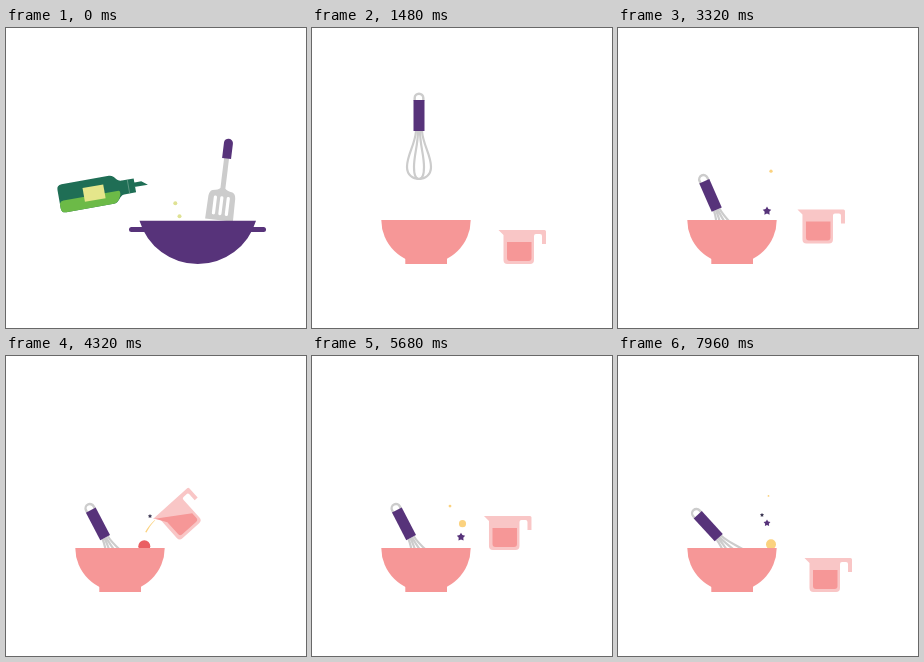
These frames come from a looping animation (300x300 px, 8000 ms). An HTML page with a canvas:

```html
<!DOCTYPE html>
<html lang="en">
<head>
<meta charset="utf-8">
<title>Mixing bowl</title>
<style>
  html, body { margin: 0; height: 100%; overflow: hidden; background: #fff; }
  canvas { display: block; width: 300px; height: 300px; }
</style>
</head>
<body>
<canvas id="stage"></canvas>
<script>
const LOOP = 8000;
const canvas = document.getElementById('stage');
const ctx = canvas.getContext('2d');
const scale = window.devicePixelRatio || 1;
canvas.width = canvas.height = 300 * scale;

const PURPLE = '#57337a', GREY = '#cccccc', PINK = '#f69797', PALE = '#f9c6c6',
      YELLOW = '#fbd27f', RED = '#ea5f63', DARK = '#3f3a55';

const mix = (a, b, p) => a + (b - a) * p;
const progress = (t, from, to) => Math.max(0, Math.min(1, (t - from) / (to - from)));
const smooth = (t, from, to) => {
  const p = progress(t, from, to);
  return p * p * (3 - 2 * p);
};

function fill(color, path) {
  ctx.fillStyle = color;
  ctx.fill(typeof path === 'string' ? new Path2D(path) : path);
}

function stroke(color, width, path) {
  ctx.strokeStyle = color;
  ctx.lineWidth = width;
  ctx.stroke(new Path2D(path));
}

function box(color, x, y, w, h, r = 0) {
  const path = new Path2D();
  path.roundRect(x, y, w, h, r);
  fill(color, path);
}

function disc(color, x, y, r) {
  const path = new Path2D();
  path.arc(x, y, r, 0, 7);
  fill(color, path);
}

function star(color, x, y, r) {
  const path = new Path2D();
  for (let i = 0; i < 10; i++) {
    const a = i * Math.PI / 5 - Math.PI / 2, d = i % 2 ? r * 0.55 : r;
    path.lineTo(x + d * Math.cos(a), y + d * Math.sin(a));
  }
  fill(color, path);
}

function placed(x, y, degrees, draw) {
  ctx.save();
  ctx.translate(x, y);
  ctx.rotate(degrees * Math.PI / 180);
  draw();
  ctx.restore();
}

function bottle() {
  fill('#1f6e55', 'M5 0H53C59 0 59 7 65 7H77V21H65C60 21 59 28.5 53 28.5H5Q0 28.5 0 23.5V5Q0 0 5 0ZM76 11L84 11L90 15.5L76 15.5Z');
  fill('#6cba47', 'M0 19Q1 16.5 4 16.5H60Q62 17 61 21Q58 28.5 53 28.5H5Q0 28.5 0 23.5Z');
  box('#e5e68b', 25, 7.5, 21, 14);
  stroke('#7fae9c', 0.6, 'M70.5 7V21');
}

function spatula() {
  box(GREY, -2.5, 18, 5, 37);
  fill(GREY, 'M-2.5 50Q-4 52 -10 53Q-13 54 -13.5 59L-14 82H14L13.5 59Q13 54 10 53Q4 52 2.5 50Z');
  for (const x of [-8, -1.5, 5]) box('#fff', x, 58, 3.2, 19, 1.5);
  box(PURPLE, -4.5, 0, 9, 20, [4.5, 4.5, 0, 0]);
}

function wokScene(t) {
  const leave = 330 * progress(t, 120, 520) ** 2;
  if (leave >= 330) return;
  placed(50.6 - leave, 157, -10, bottle);
  placed(223 + leave, 110.7, 7, spatula);
  for (const [x, y] of [[169.3, 175], [173.5, 188]]) {
    const fallen = y + t * 0.13;
    if (fallen < 197) disc('#dfe294', x, fallen, 2);
  }
  placed(leave, 0, 0, () => {
    box(PURPLE, 123, 199, 137, 5, 2.5);
    fill(PURPLE, 'M133.5 192.7H250A60.8 60.8 0 0 1 133.5 192.7Z');
  });
}

function bowl(color, x) {
  placed(x, 192, 0, () => {
    fill(color, 'M-44.7 0H44.7A44.7 44 0 0 1 -44.7 0Z');
    box(color, -20.7, 38, 41.7, 6);
  });
}

// The dark bowl catches up with the pale one on the way in.
function bowls(t) {
  const x = Math.min(114, 51 + (t - 840) * 0.37);
  if (x < 114) bowl(PALE, x);
  bowl(PINK, x - 63 * (1 - progress(t, 760, 840)));
}

// Origin is the lower end of the grip.
function whisk() {
  stroke(GREY, 2.2, 'M-3 0C-4 14 -12 24 -12 36C-12 52 12 52 12 36C12 24 4 14 3 0');
  stroke(GREY, 2.2, 'M-1 0C-1 14 -5 24 -5 36C-5 44 -3 48 0 48C3 48 5 44 5 36C5 24 1 14 1 0');
  stroke(GREY, 2.4, 'M-4.3 -30V-33A4.3 4.3 0 0 1 4.3 -33V-30');
  box(PURPLE, -5.5, -31, 11, 31);
}

function whiskPose(t) {
  const arrive = 1 - (1 - progress(t, 560, 1000)) ** 2;
  const plunge = smooth(t, 1720, 1960);
  const stir = Math.cos((t - 200) / 400 * Math.PI);
  return [
    mix(mix(-50, 107, arrive), 100.2 - 1.8 * stir, plunge),
    mix(mix(123.5, 103, smooth(t, 840, 1300)), 181.6, plunge),
    mix(-7.5 * (1 - smooth(t, 760, 1000)), -37.5 + 17 * stir, plunge)
  ];
}

// Origin is the tip of the spout; tip runs from 0 (upright) to 1 (pouring).
function cup(tip, slosh) {
  fill(PALE, 'M0 0H46Q47.5 0 47.5 1.5V14H43.5V6Q43.5 4 41.5 4H37.5Q35.5 4 35.5 6V30Q35.5 34 31.5 34H9Q5 34 5 30V5Z');
  const left = 12 + slosh, right = mix(12, 22, tip) - slosh;
  fill(PINK, `M8.5 ${left}L${mix(8.5, 1.5, tip)} ${mix(left, 1, tip)}L33 ${right}V28Q33 31 30 31H11.5Q8.5 31 8.5 28Z`);
}

function stream(age) {
  const head = progress(age, 320, 420), tail = progress(age, 1240, 1360);
  if (head <= tail) return;
  const width = mix(0.2, 1, progress(age, 360, 560)) * (1 - 0.6 * tail);
  const outer = [], inner = [];
  for (let i = 0; i <= 16; i++) {
    const u = mix(tail, head, i / 16), half = width * (1 + 4.2 * u ** 0.7);
    const x = 149 - 13 * (1 - (1 - u) ** 2.3), y = 164 + 30 * u;
    outer.push([x - half, y - half * (1 - u) * 0.5]);
    inner.unshift([x + half, y + half * (1 - u) * 0.5]);
  }
  const path = new Path2D();
  [...outer, ...inner].forEach(p => path.lineTo(...p));
  fill(YELLOW, path);
}

// The cup slides in, then twice lifts, pours and returns.
function pouring(t) {
  const age = t < 1480 ? 0 : t < 6440 ? (t - 1480) % 2480 : 0;
  const lift = smooth(age, 0, 200) - smooth(age, 1690, 1980);
  const tip = smooth(age, 200, 360) - smooth(age, 1340, 1690);
  const swing = Math.sin(Math.PI * progress(t, 560, 960));
  const slide = 143 * (1 - progress(t, 520, 700)) ** 2;
  stream(age);
  placed(
    186.5 + slide - 4.5 * swing - 15 * lift - 24.5 * tip,
    202 + swing - 43.5 * lift + 4.5 * tip,
    -8 * swing - 42 * tip,
    () => cup(tip, 1.7 * swing));
}

// Each ingredient drops again and again at its own rate.
const INGREDIENTS = [
  { draw: disc, color: YELLOW, x: 153, size: 5, first: 1722, every: 1420 },
  { draw: star, color: PURPLE, x: 143.5, size: 5, first: 1716, every: 2700 },
  { draw: disc, color: YELLOW, x: 150.5, size: 4.5, first: 2652, every: 2600 },
  { draw: star, color: PURPLE, x: 149, size: 4.6, first: 2792, every: 2372 },
  { draw: disc, color: YELLOW, x: 138, size: 2.8, first: 3707, every: 1700 },
  { draw: disc, color: RED, x: 138.3, size: 6, first: 3752, every: 2600 },
  { draw: star, color: DARK, x: 144, size: 3.2, first: 3950, every: 1825 }
];

function ingredients(t) {
  for (const { draw, color, x, size, first, every } of INGREDIENTS) {
    const p = (t - first) % every / 600;
    if (p > 0 && p < 1.1) draw(color, x, 138 + 58 * p * p, size * Math.min(1, p * 1.1));
  }
}

function render(now) {
  const t = now % LOOP;
  ctx.setTransform(scale, 0, 0, scale, 0, 0);
  ctx.fillStyle = '#fff';
  ctx.fillRect(0, 0, 300, 300);
  wokScene(t);
  placed(...whiskPose(t), whisk);
  pouring(t);
  ingredients(t);
  bowls(t);
}

const start = performance.now();
function tick() {
  render(performance.now() - start);
  requestAnimationFrame(tick);
}
tick();
</script>
</body>
</html>
```
